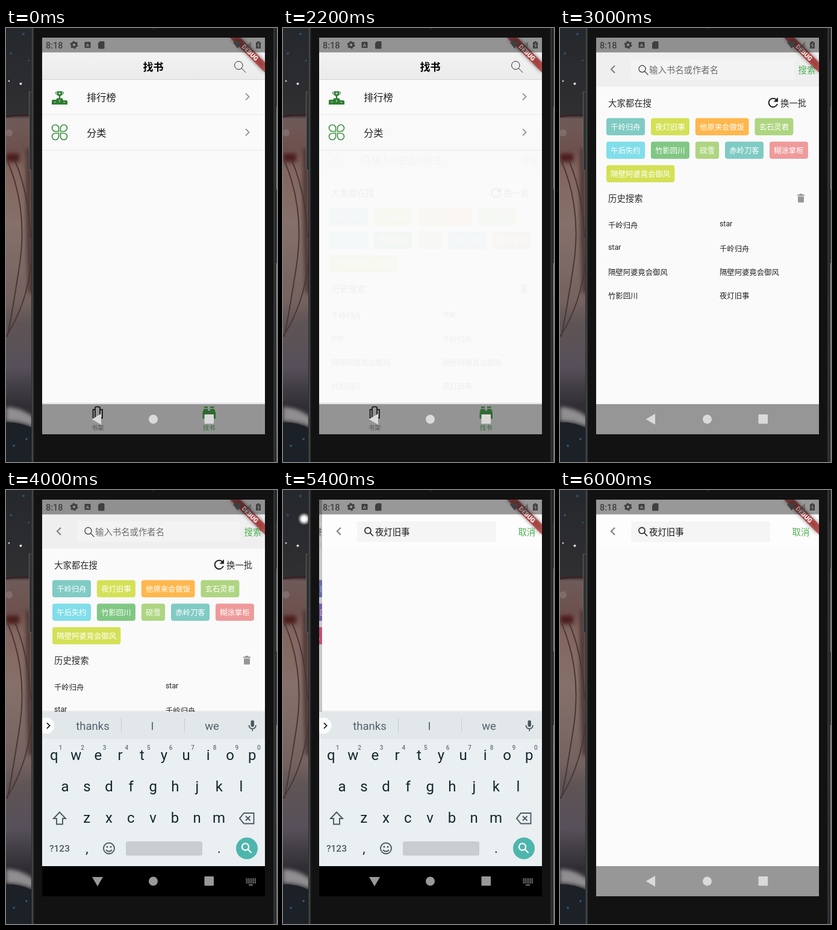
An HTML page for the animation above (8000 ms loop, 450 px wide and 720 px high).

```html
<!DOCTYPE html>
<html lang="zh-CN">
<head>
<meta charset="utf-8">
<title>Book search</title>
<style>
  html, body { margin: 0; width: 100%; height: 100%; overflow: hidden; background: #111; }
  svg { display: block; width: 450px; height: 720px; }
  text { font-family: Roboto, "Noto Sans CJK SC", "Noto Sans CJK", sans-serif; white-space: pre; }
  .line { fill: none; stroke: currentColor; }
  .mid { text-anchor: middle; }
  .soft { filter: blur(3px); }
</style>
</head>
<body>
<svg viewBox="0 0 450 720">
  <defs>
    <clipPath id="screenClip"><path d="M60 16h370v658H60z"/></clipPath>
    <clipPath id="keyboardClip"><path d="M60 16h370v608H60z"/></clipPath>
    <linearGradient id="wall" x2="0" y2="1">
      <stop offset="0" stop-color="#25282c"/><stop offset=".2" stop-color="#302f32"/>
      <stop offset=".21" stop-color="#6f5a58"/><stop offset=".28" stop-color="#6d514e"/>
      <stop offset=".33" stop-color="#82665f"/><stop offset=".45" stop-color="#867069"/>
      <stop offset=".63" stop-color="#746260"/><stop offset=".68" stop-color="#5f5455"/>
      <stop offset=".78" stop-color="#57505a"/><stop offset=".87" stop-color="#302e33"/>
    </linearGradient>
    <linearGradient id="rightWall" x2="0" y2="1">
      <stop offset=".06" stop-color="#33353a"/><stop offset=".2" stop-color="#74737a"/>
      <stop offset=".6" stop-color="#8c8a92"/><stop offset="1" stop-color="#62616a"/>
    </linearGradient>
    <linearGradient id="bar" x2="0" y2="1">
      <stop offset="0" stop-color="#f6f6f6"/><stop offset="1" stop-color="#ebebeb"/>
    </linearGradient>
    <linearGradient id="shade">
      <stop offset="0" stop-opacity="0"/><stop offset="1" stop-opacity=".24"/>
    </linearGradient>
    <linearGradient id="edge">
      <stop offset="0" stop-color="#17191a"/><stop offset=".3" stop-color="#4b4e50"/>
      <stop offset="1" stop-color="#121212"/>
    </linearGradient>
    <radialGradient id="glow">
      <stop offset=".35" stop-color="#fff"/><stop offset="1" stop-color="#fff" stop-opacity="0"/>
    </radialGradient>
    <g id="lens"><circle class="line" r="5.6"/><path class="line" d="M4 4l6 6"/></g>
    <path id="next" class="line" d="M-3-5.5l5.5 5.5-5.5 5.5" stroke-width="2"/>
    <path id="back" class="line" d="M91 62.500l-6 6 6 6" color="#858585" stroke-width="2.3"/>
    <path id="petal" class="line" d="M87.500 171.500h-5.500a5.500 5.500 0 1 1 5.500-5.500z" stroke-width="1.700"/>
  </defs>

  <!-- wallpaper -->
  <path d="M0 0h450v720H0z" fill="url(#wall)"/>
  <g fill="none">
    <path d="M0 147q18-3 42-2" stroke="#3a2224" stroke-width="3"/>
    <path class="soft" d="M0 215h22" stroke="#4c1d1c" stroke-width="14"/>
    <path class="soft" d="M38 200q-2 120 4 240" stroke="#4c3634" stroke-width="9"/>
    <path d="M14 218q24 55 27 130M3 222q34 80 19 175T2 512M42 390q-8 70-42 122" stroke="#4a3635" stroke-width="2"/>
  </g>
  <path class="soft" d="M0 629q24 0 46 17v16q-22-10-46-10z" fill="#918e91"/>
  <path d="M0 654q24 0 42 9v57H0z" fill="#1c2027"/>
  <g fill="#2a5270"><circle cx="8" cy="42" r="2"/><circle cx="29" cy="10" r="2"/><circle cx="38" cy="54" r="1.500"/><circle cx="13" cy="693" r="2"/><circle cx="34" cy="682" r="2"/></g>
  <g fill="#ddd"><circle cx="5" cy="88" r="1.300"/><circle cx="24.500" cy="92.500" r="2"/><circle cx="5" cy="174" r="6" opacity=".17"/></g>
  <circle id="flake" r="10.500" fill="url(#glow)"/>

  <!-- phone body -->
  <path d="M38.500 106h4.500v130h-4.500z" fill="#303233" stroke="#777" stroke-width=".7"/>
  <path d="M42 0h407v720H42z" fill="#121212"/>
  <path d="M42 0h5v720h-5z" fill="url(#edge)"/>
  <path d="M444 0h3v720h-3z" fill="#303234"/>
  <path d="M447 0h1.500v720h-1.500z" fill="#191a1b"/>
  <path d="M448.500 0h1.500v720h-1.500z" fill="url(#rightWall)"/>
  <path d="M448 53h2v77h-2zM448 268h2v122h-2z" fill="#3a3b3d"/>
  <circle cx="245" r="2" fill="#292a30"/>

  <g clip-path="url(#screenClip)">
    <g id="findPage">
      <path d="M60 16h370v658H60z" fill="#fafafa"/>
      <path d="M60 16h370v69H60z" fill="url(#bar)"/>
      <path d="M60 85.500h370" stroke="#d4d4d4"/>
      <path d="M60 143.500h370M60 202.500h370" stroke="#e9e9e9"/>
      <text class="mid" x="244.500" y="70.500" font-size="17" font-weight="700">找书</text>
      <use href="#lens" transform="translate(386.300 62) scale(1.200)" stroke-width=".8" color="#222"/>
      <g font-size="16.300" fill="#1c1c1c"><text x="134" y="121">排行榜</text><text x="134" y="179.700">分类</text></g>
      <g color="#999"><use href="#next" x="401" y="114"/><use href="#next" x="401" y="173"/></g>
      <g fill="#2e7d32" color="#3d9142">
        <path d="M84.500 105h9v3.500q0 3.500-3.300 4.500v3.500h2.300q2 0 2 2v1.500h5.500q2 0 2 2v5H76v-6q0-2 2-2h5.500v-.5q0-2 2-2h2.300V113q-3.300-1-3.300-4.500z"/>
        <path d="M84 106.500h-1.500v2.500l2.500 2m9-4.500h1.500v2.500l-2.500 2" fill="none" stroke="#2e7d32"/>
        <path d="M89 119v4M80 123h2.500M95.500 123.500h2.500M88 107.500h2v2h-2z" fill="none" stroke="#d9eadb"/>
        <use href="#petal"/><use href="#petal" transform="rotate(90 89 173)"/>
        <use href="#petal" transform="rotate(180 89 173)"/><use href="#petal" transform="rotate(270 89 173)"/>
      </g>
      <path d="M60 622.500h370" stroke="#d5d5d5"/>
      <path d="M60 623h370v51H60z" fill="#f6f6f6"/>
      <path d="M144.500 633h3.500v14h-3.500zM148 630q0-1.500 1.500-1.500h5q1.500 0 1.500 1.500v17h-8zM156 633h4v14h-4z" fill="none" stroke="#000" stroke-width="1.500"/>
      <path d="M329 628h6v2.500h-6zM339 628h6.500v2.500H339zM328.500 632h7v3h3.500v-3h7l2 6v10h-8v-6h-5.500v6h-8v-10z" fill="#4caf50"/>
      <g class="mid" font-size="10.300"><text x="152" y="666.500" fill="#858585">书架</text><text x="337" y="666.500" fill="#4caf50">找书</text></g>
    </g>

    <g id="searchPage">
      <path d="M60 16h370v658H60z" fill="#fafafa"/>
      <path d="M60 16h370v81.500H60z" fill="#efefef"/>
      <use href="#back"/>
      <rect x="118" y="52" width="271" height="34" rx="3" fill="#f3f3f3"/>
      <use href="#lens" transform="translate(136.500 67.800)" stroke-width="1.200" color="#333"/>
      <path id="cursor" d="M149.500 61.500v16" stroke="#111" stroke-width="1.500"/>
      <g font-size="14.400" fill="#2b2b2b">
        <text x="148" y="75" fill="#6c6c6c">输入书名或作者名</text>
        <text x="395.500" y="75" fill="#4caf50">搜索</text>
        <text x="80" y="129.500">大家都在搜</text>
        <text x="366" y="129.500">换一批</text>
        <text x="80" y="288">历史搜索</text>
      </g>
      <path d="M360 120a7.200 7.200 0 1 0 .8 6" fill="none" stroke="#222" stroke-width="2"/>
      <path d="M362 115v7.500h-7.500z" fill="#222"/>
      <path d="M394 276.500h3l1-1.500h4l1 1.500h3v2h-12zM395 279.500h10v8.500q0 1.500-1.500 1.500h-7q-1.500 0-1.500-1.500z" fill="#969696"/>
      <g id="chips" font-size="12.350" fill="#fff"></g>
      <g id="history" font-size="12.350" fill="#222"></g>
    </g>

    <g id="resultPage">
      <path d="M42 16h18v658H42z" fill="url(#shade)"/>
      <path d="M60 16h370v658H60z" fill="#fbfbfb"/>
      <path d="M60 16h370v81.500H60z" fill="#fdfdfd"/>
      <use href="#back"/>
      <rect x="118" y="52" width="231" height="34" rx="3" fill="#f5f5f5"/>
      <use href="#lens" transform="translate(136 67.300) scale(.9)" stroke-width="2" color="#333"/>
      <g font-size="14.400"><text id="query" x="148" y="75" fill="#111"></text><text x="385.500" y="75" fill="#4caf50">取消</text></g>
    </g>

    <!-- corner ribbon -->
    <path class="soft" d="M372 16h17.300L430 56.700V74z" opacity=".5"/>
    <path d="M372 16h17.300L430 56.700V74z" fill="#b71c1c" fill-opacity=".63"/>
    <text class="mid" transform="translate(402.700 43.300) rotate(45)" font-size="10.500" font-weight="900" fill="#fff">DEBUG</text>

    <!-- system bars -->
    <path d="M60 16h370v24.500H60z" opacity=".4"/>
    <g fill="#3f3f3f">
      <text x="66" y="33.500" font-size="14.500" font-weight="500">8:18</text>
      <circle cx="113" cy="28" r="3.700" fill="none" stroke="#3f3f3f" stroke-width="3"/>
      <circle cx="113" cy="28" r="5.700" fill="none" stroke="#3f3f3f" stroke-width="1.800" stroke-dasharray="3 2.970"/>
      <rect x="130.500" y="23" width="10" height="10" rx="1"/>
      <text class="mid" x="135.500" y="31" font-size="8" font-weight="700" fill="#999">A</text>
      <path d="M156 22h6q1.500 0 1.500 1.500v9.500q0 1.500-1.500 1.500h-7.500q-1.500 0-1.500-1.500V25z"/>
      <path d="M377 24q7.500-5 15 0l-7.500 10z"/>
      <path d="M407 22v12h-12z" opacity=".45"/>
      <path d="M417.500 22h3v1.500h2.500V34h-8V23.500h2.500z"/>
      <path d="M420 25l-2.500 4h3l-1.500 3.500" fill="none" stroke="#999"/>
    </g>
    <g id="navLight">
      <path d="M60 624h370v50H60z" opacity=".4"/>
      <g fill="#dadada"><path d="M158 640v18l-15.500-9z"/><circle cx="244.500" cy="649" r="7.500"/><rect x="329.500" y="641" width="15.500" height="15.500" rx="1"/></g>
    </g>
    <g id="navDark">
      <path d="M60 624h370v50H60z"/>
      <g fill="#999"><path d="M143 642h18l-9 15.500z"/><circle cx="244.500" cy="649" r="7.500"/><rect x="329.500" y="641" width="15.500" height="15.500" rx="1"/><path d="M403 654.500h7v1.500h-7z"/></g>
      <path d="M398.500 645.500h16.500M398.500 648.500h16.500M398.500 651.500h16.500" stroke="#999" stroke-width="1.800" stroke-dasharray="1.800 1.150"/>
    </g>

    <g clip-path="url(#keyboardClip)">
      <g id="keyboard">
        <path d="M60 366h370v2H60z" opacity=".06"/>
        <path d="M60 368h370v257H60z" fill="#eaeff1"/>
        <path d="M60 368h370v45H60z" fill="#e2e7ea"/>
        <path d="M191.500 379v24M296.500 379v24" stroke="#c5cccf"/>
        <circle cx="67" cy="391" r="13.500" fill="#fbfcfc"/>
        <use href="#next" transform="translate(70.500 391) scale(.85)" color="#111"/>
        <g class="mid" font-size="18.500" fill="#53616a"><text x="144" y="398">thanks</text><text x="243" y="398">I</text><text x="342" y="398">we</text></g>
        <rect x="406.500" y="382" width="5.500" height="11" rx="2.700" fill="#4b5961"/>
        <path class="line" d="M403.500 390q0 6 5.700 6t5.700-6M409.200 396v4" color="#4b5961" stroke-width="1.700"/>
        <g id="keys" class="mid" fill="#11262e"></g>
        <g fill="none" stroke="#4b5961" stroke-width="1.900">
          <path d="M89 534.500l10 10.500h-5v9.500H84V545h-5z"/>
          <path d="M395 536h16.500v17.500H395l-7-8.700zM398 541l7.500 7.500M405.500 541l-7.500 7.500"/>
          <circle cx="171" cy="594.500" r="9"/><path d="M166 597q5 5.500 10 0"/>
        </g>
        <g fill="#4b5961"><circle cx="168" cy="592" r="1.500"/><circle cx="174" cy="592" r="1.500"/></g>
        <rect x="199" y="583" width="127" height="23.500" rx="3" fill="#c8cdd0"/>
        <circle cx="400" cy="594.500" r="18" fill="#4db6ac"/>
        <use href="#lens" transform="translate(397.500 592)" stroke-width="2.300" color="#fff"/>
      </g>
    </g>
  </g>
</svg>

<script>
const $ = id => document.getElementById(id);
const LOOP = 8000, SCREEN_W = 370, SCREEN_H = 658, KEYBOARD_H = 259;

const titles = ["千岭归舟", "夜灯旧事", "他原来会做饭", "玄石灵君", "午后失约",
  "竹影回川", "砚雪", "赤岭刀客", "糊涂掌柜", "隔壁阿婆竟会御风"];
const chipColors = ["#80cbc4", "#d4e157", "#ffb74d", "#aed581", "#80deea",
  "#81c784", "#aed581", "#80cbc4", "#ef9a9a", "#d4e157"];
const newChipColors = ["#4db6ac", "#7986cb", "#81c784", "#ffb74d", "#ef9a9a",
  "#9575cd", "#80deea", "#aed581", "#d4e157", "#f06292"];

// Chips flow left to right in rows starting at these indices.
let chipX = 77, chipY = 110.5;
$("chips").innerHTML = titles.map((title, i) => {
  if ([0, 4, 9].includes(i)) { chipX = 77; chipY += 39; }
  const width = title.length * 12.35 + 14.6, x = chipX;
  chipX += width + 9.9;
  return `<rect x="${x}" y="${chipY}" width="${width}" height="28.500" rx="4"/>
    <text x="${x + 7.3}" y="${chipY + 19}">${title}</text>`;
}).join("");
const chipRects = [...$("chips").querySelectorAll("rect")];

const searches = [titles[0], "star", "star", titles[0], titles[9], titles[9], titles[5], titles[1]];
$("history").innerHTML = searches.map((word, i) => {
  const y = 332 + 39.1 * (i >> 1) - (word === "star" ? 3 : 0);
  return `<text x="${i % 2 ? 265 : 80}" y="${y}">${word}</text>`;
}).join("");
$("query").textContent = titles[1];

const label = (text, x, y, size, style = "") =>
  `<text x="${x}" y="${y}" font-size="${size}" ${style}>${text}</text>`;
const keyRow = (letters, x, y) =>
  [...letters].map((letter, i) => label(letter, x + 36.55 * i, y, 24)).join("");
$("keys").innerHTML = keyRow("qwertyuiop", 79.8, 447.5) + keyRow("asdfghjkl", 98, 499.5) +
  keyRow("zxcvbnm", 134.3, 551.5) +
  [..."1234567890"].map((n, i) =>
    label(n, 90.5 + 36.6 * i, 431, 10, 'fill="#66737a" font-weight="500"')).join("") +
  label("?123", 89, 600, 15.5, 'fill="#4b5961" font-weight="500"') +
  label(",", 134.5, 602, 22) + label(".", 354, 602, 22);

const clamp = v => Math.min(1, Math.max(0, v));
const ramp = (t, start, length) => clamp((t - start) / length);

function bezier(x1, y1, x2, y2) {
  const at = (a, b, s) => 3 * a * s * (1 - s) ** 2 + 3 * b * s * s * (1 - s) + s ** 3;
  return x => {
    if (x <= 0 || x >= 1) return clamp(x);
    let low = 0, high = 1;
    for (let i = 0; i < 24; i++) {
      const mid = (low + high) / 2;
      if (at(x1, x2, mid) < x) low = mid; else high = mid;
    }
    return at(y1, y2, low);
  };
}
const slideEase = bezier(.35, .91, .33, .97);
const fastOutSlowIn = bezier(.4, 0, .2, 1);
const easeIn = bezier(.42, 0, 1, 1);

const move = (id, x, y) => $(id).setAttribute("transform", `translate(${x} ${y})`);
const show = (id, visible) => $(id).setAttribute("display", visible ? "inline" : "none");

const OPEN_SEARCH = 2150, OPEN_RESULT = 5085;
const KEYBOARD_UP = 3150, KEYBOARD_DOWN = 5620;

function draw(t) {
  const rise = ramp(t, OPEN_SEARCH, 300);
  const slide = slideEase(ramp(t, OPEN_RESULT, 400));
  show("searchPage", rise > 0);
  $("searchPage").setAttribute("opacity", easeIn(rise));
  move("searchPage", -slide * SCREEN_W / 3, (1 - fastOutSlowIn(rise)) * SCREEN_H / 4);
  show("resultPage", slide > 0);
  move("resultPage", (1 - slide) * SCREEN_W, 0);

  const colors = t < OPEN_RESULT ? chipColors : newChipColors;
  chipRects.forEach((rect, i) => rect.setAttribute("fill", colors[i]));
  const blinkOn = t % 1000 >= 500 || t >= 5000;
  show("cursor", t >= 3500 && t < OPEN_RESULT && blinkOn);

  const raised = fastOutSlowIn(ramp(t, KEYBOARD_UP, 300)) - fastOutSlowIn(ramp(t, KEYBOARD_DOWN, 250));
  show("keyboard", raised > 0);
  move("keyboard", 0, (1 - raised) * KEYBOARD_H);
  show("navDark", raised > 0);
  show("navLight", raised <= 0);

  const drift = t - 5000;
  move("flake", 30 + drift / 80, 73 - drift / 16);
  $("flake").setAttribute("opacity", ramp(t, 4300, 500) * (1 - ramp(t, 5700, 250)));
}

const begin = performance.now();
function tick() {
  draw((performance.now() - begin) % LOOP);
  requestAnimationFrame(tick);
}
tick();
</script>
</body>
</html>
```
